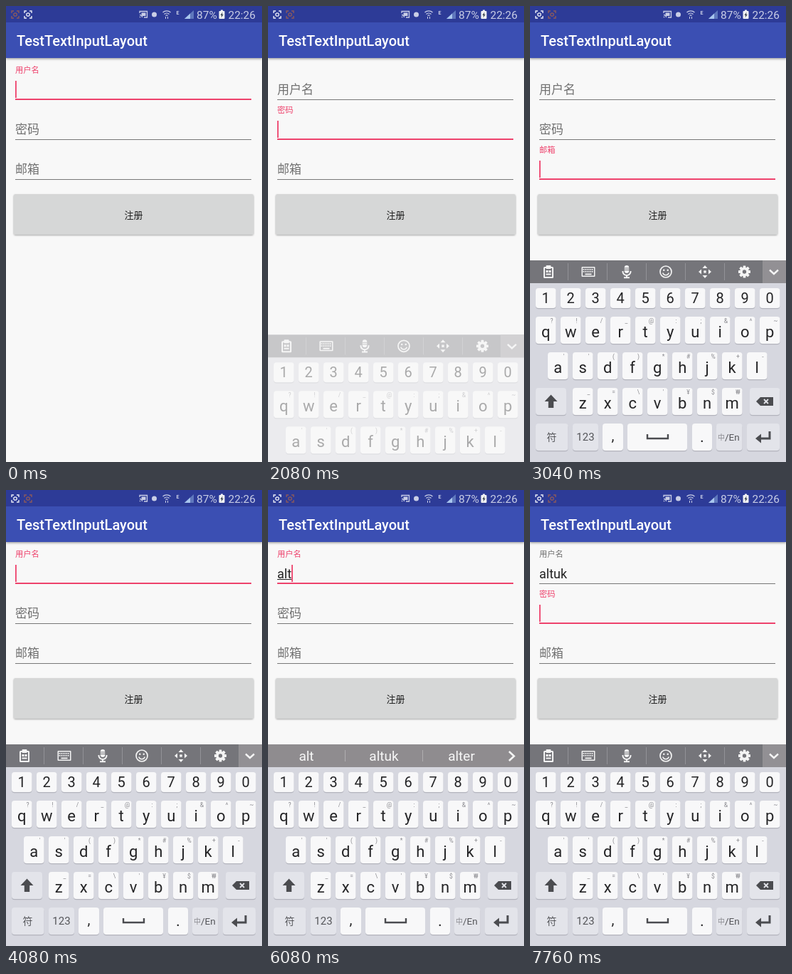
An HTML page for the animation above (8000 ms loop, 360 by 640 pixels).

```html
<!DOCTYPE html>
<html lang="zh">
<head>
<meta charset="utf-8">
<title>TestTextInputLayout</title>
<style>
html, body { margin: 0; width: 100%; height: 100%; overflow: hidden; background: #f8f8f8; }
svg { display: block; width: 360px; height: 640px; font-family: Roboto, "Noto Sans CJK SC", "Noto Sans CJK", sans-serif; }
.mid { text-anchor: middle; }
.line { fill: none; stroke: #f4f4f4; stroke-width: 2; }
</style>
</head>
<body>
<svg id="stage" viewBox="0 0 360 640" xmlns="http://www.w3.org/2000/svg"></svg>
<script>
const LOOP = 8000;
const PINK = [238, 66, 108], GRAY = [112, 112, 112];
const HINTS = ['用户名', '密码', '邮箱'];
const FOCUS = [[0, 0], [1800, 1], [2760, 2], [3640, 0], [7280, 1]];
const BLINK_OFF = [[640, 1120], [1600, 1800], [2320, 2760], [3280, 3640], [4560, 5040], [6960, 7280]];
const KEYBOARD_IN = 2000, TOOLBAR_BACK = 7280;
// time of press, time of release, letter, suggestions
const PRESSES = [
  [5040, 5280, 'a', ['a', 'at', 'and']],
  [5520, 5680, 'l', ['al', 'altuk', 'all']],
  [5840, 6000, 't', ['alt', 'altuk', 'alter']],
  [6240, 6400, 'u', ['altu', 'altuk', 'alto']],
  [6480, 6600, 'k', ['altuk', 'Altuk', 'alone']]
];

const rect = (x, y, w, h, fill, r = 0, more = '') =>
  `<rect x="${x}" y="${y}" width="${w}" height="${h}" rx="${r}" fill="${fill}" ${more}/>`;
const text = (x, y, size, str, fill, more = '') =>
  `<text x="${x}" y="${y}" font-size="${size}" fill="${fill}" ${more}>${str.replace('&', '&amp;')}</text>`;
const mid = (x, y, size, str, fill, more = '') => text(x, y, size, str, fill, 'class="mid" ' + more);
const path = (d, more = 'class="line"') => `<path d="${d}" ${more}/>`;
const at = (x, y, body) => `<g transform="translate(${x} ${y})">${body}</g>`;

function statusBar() {
  const pale = '#c9cee6';
  const capture = (x, color) => at(x, 12, path('M-5-2V-5H-2M2-5H5V-2M5 2V5H2M-2 5H-5V2',
    `fill="none" stroke="${color}" stroke-width="1.4"`) +
    `<circle r="2.2" fill="none" stroke="${color}" stroke-width="1.3"/>`);
  const stroke = `fill="none" stroke="${pale}" stroke-width="1.3"`;
  return rect(0, 0, 360, 23, '#2d3b97') +
    `<g id="early">${capture(13, '#8c5a5c')}${capture(31, '#eceef8')}</g>` +
    `<g id="later">${capture(13, '#eceef8')}${capture(31, '#8c5a5c')}</g>` +
    path('M188 10V7.5H198.500V16H194M188 12.500A3.500 3.500 0 0 1 191.500 16M188 15L189 16', stroke) +
    rect(190.5, 9.5, 6, 4.5, pale) +
    `<circle cx="208.500" cy="12" r="3.500" fill="${pale}"/>` +
    path('M220.500 9A8 8 0 0 1 231.500 9M222.500 11.500A5 5 0 0 1 229.500 11.500M224.500 13.500A2.500 2.500 0 0 1 227.500 13.500', stroke) +
    path('M224.500 15V18M227.500 15V18', `stroke="${pale}"`) +
    mid(241.5, 12, 7, 'E', pale, 'font-weight="700"') +
    path('M251 18L264 6V18Z', 'fill="#5f78bd"') + path('M251 18L259 10.500V18Z', 'fill="#a8c6ee"') +
    text(268, 17.5, 15.5, '87%', pale) +
    rect(299.5, 7, 8, 11, '#f1f2f4', 1) + rect(302, 5.5, 3, 2, '#f1f2f4') +
    path('M304.500 8.500L301.500 13H303.200L302.500 16.500L305.800 11.800H304Z', 'fill="#3c4550"') +
    text(312.5, 17.5, 15.4, '22:26', pale);
}

function form() {
  const fields = HINTS.map((hint, i) =>
    rect(13, 131 + 56 * i, 332, 1, '#777', 0, `id="rule${i}"`) +
    text(0, 0, 17, hint, '#707070', `id="hint${i}"`)).join('');
  return rect(0, 23, 360, 50, '#3a4fb3', 0, 'filter="url(#soft)"') +
    text(15, 56, 20, 'TestTextInputLayout', '#fff', 'font-weight="500"') + fields +
    text(13, 123.5, 18, '', '#222', 'id="typed"') +
    rect(13, 125, 0, 1, '#222', 0, 'id="under"') +
    rect(13, 105, 1.8, 24, 'rgb(238,66,108)', 0, 'id="cursor"') +
    rect(11, 264, 337, 56.5, '#d6d7d7', 2, 'filter="url(#lift)"') +
    mid(179.5, 297.5, 13, '注册', '#1c1c1c', 'font-weight="500"');
}

function toolbar() {
  const w = '#f4f4f4', bar = '#75757a';
  const divs = [53, 108, 163, 218, 273].map(x => rect(x, 361, 1, 24, '#929297')).join('');
  const dots = [-4, -1].map(y => [-7, -4, -1, 2, 5].map(x => rect(x, y, 2, 1.6, bar)).join('')).join('');
  const teeth = [0, 45, 90, 135].map(a => rect(-1.9, -8.5, 3.8, 17, w, 0.6, `transform="rotate(${a})"`)).join('');
  const arrows = [0, 90, 180, 270].map(a =>
    `<path d="M-3.500-5L0-9L3.500-5Z" fill="${w}" transform="rotate(${a})"/>`).join('');
  return rect(0, 357, 360, 32, bar) + rect(327, 357, 33, 32, '#929094') + divs +
    at(26, 373, rect(-7, -7, 14, 16, w, 1.5) + rect(-5, -5, 10, 12, bar) + rect(-3.5, -9, 7, 5, w, 1) +
      rect(-3.5, -2, 3, 3, w) + rect(0.5, -2, 3, 3, w) + rect(-3.5, 2.5, 7, 2, w)) +
    at(81.5, 373, rect(-9, -7, 19, 14, w, 1) + rect(-7.5, -5.5, 16, 11, bar) +
      dots.split(bar).join(w) + rect(-4, 2.5, 9, 1.8, w)) +
    at(136, 373, rect(-3.2, -9, 6.4, 11, w, 3.2) + rect(-3.2, -5.5, 6.4, 1, bar) + rect(-3.2, -3, 6.4, 1, bar) +
      path('M-5.500-1V0A5.500 5 0 0 0 5.500 0V-1M0 5V8M-4 8.200H4')) +
    at(191, 373, '<circle r="8" class="line" style="stroke-width:1.7"/>' + rect(-4, -3.5, 2.5, 2.5, w, 1.2) +
      rect(1.5, -3.5, 2.5, 2.5, w, 1.2) + path('M-4.300 1.500A4.500 4.500 0 0 0 4.300 1.500', 'class="line" style="stroke-width:1.5"')) +
    at(246, 373, arrows + rect(-1.7, -1.7, 3.4, 3.4, w, 1)) +
    at(301.5, 373, teeth + `<circle r="6.300" fill="${w}"/><circle r="2.700" fill="${bar}"/>`) +
    path('M337 370.500L343 376L349 370.500', 'class="line" style="stroke-width:2.4"');
}

function suggestions() {
  return rect(0, 357, 360, 32, '#8f8c8f') + rect(108, 365, 1, 16, '#b0aeb0') + rect(217, 365, 1, 16, '#b0aeb0') +
    [54, 163, 272].map((x, i) => mid(x, 380, 19, '', '#f7f7f7', `id="word${i}"`)).join('') +
    path('M339 367L346 373.500L339 380', 'class="line" style="stroke-width:2.6"');
}

const keyAt = {};
const LIGHT = '#f8f8f9', DIM = '#e3e4ea', INK = '#242426';
const cap = (x, y, w, h, fill) => rect(x, y + 1.3, w, h, '#b3b4bd', 4) + rect(x, y, w, h, fill, 4);

function keyRow(x0, y, h, letters, marks, size) {
  return [...letters].map((c, i) => {
    const x = x0 + 35 * i;
    keyAt[c] = [x + 14, y];
    return cap(x, y, 28.5, h, LIGHT) + mid(x + 14.2, y + h / 2 + size * 0.36 + (marks ? 2 : 0), size, c, INK) +
      (marks ? mid(x + 22.5, y + 9, 8.5, marks[i], '#8b8b90') : '');
  }).join('');
}

function keyboard() {
  return rect(0, 389, 360, 251, '#d6d7df') +
    `<g id="tools">${toolbar()}</g><g id="words">${suggestions()}</g>` +
    keyRow(8, 396, 28, '1234567890', '', 20) +
    keyRow(8, 436, 38, 'qwertyuiop', '?!/_@:;&^~', 22) +
    keyRow(25, 486, 38, 'asdfghjkl', "''()*#%+-", 22) +
    keyRow(60, 536, 38, 'zxcvbnm', "_=\\'¥$₩", 22) +
    cap(8, 536, 43, 38, DIM) + path('M29.500 545.500L38.500 555H33.200V564H25.800V555H20.500Z', 'fill="#4b4c50"') +
    cap(309, 536, 42.5, 38, DIM) + path('M318 555L324 549H342V561H324Z', 'fill="#4b4c50"') +
    path('M329 552L335 558M335 552L329 558', `stroke="${DIM}" stroke-width="1.8"`) +
    cap(8, 586, 45.500, 38, DIM) + mid(30.5, 610, 14, '符', '#55565a') +
    cap(60, 586, 36, 38, DIM) + mid(78, 610, 15, '123', '#55565a') +
    cap(102, 586, 29, 38, LIGHT) + mid(116.5, 610, 20, ',', INK) +
    cap(137, 586, 84, 38, LIGHT) + path('M165 601V607H194V601', 'fill="none" stroke="#4b4c50" stroke-width="2.4"') +
    cap(228, 586, 28, 38, LIGHT) + mid(242, 612, 22, '.', INK) +
    cap(262, 586, 36.5, 38, DIM) + text(264, 609, 10, '中', '#8a8b90') + text(274, 610, 13.5, '/En', '#55565a') +
    cap(305, 586, 46, 38, DIM) +
    path('M337 597V607H323', 'fill="none" stroke="#4b4c50" stroke-width="3"') +
    path('M325 600.500V613.500L317 607Z', 'fill="#4b4c50"') +
    `<g id="popup">${rect(-27, -75, 54, 67, '#fafafa', 6, 'filter="url(#lift)"')}${mid(0, -26, 41, '', INK, 'id="big"')}</g>`;
}

const stage = document.getElementById('stage');
stage.innerHTML = `<defs>
  <filter id="soft" x="-5%" y="-20%" width="110%" height="160%"><feDropShadow dx="0" dy="1.500" stdDeviation="1.500" flood-opacity=".35"/></filter>
  <filter id="lift" x="-10%" y="-10%" width="120%" height="125%"><feDropShadow dx="0" dy="1.200" stdDeviation="1" flood-opacity=".38"/></filter>
  </defs>` + rect(0, 0, 360, 640, '#f8f8f8') + form() + statusBar() + `<g id="keyboard">${keyboard()}</g>`;

const el = {};
stage.querySelectorAll('[id]').forEach(node => el[node.id] = node);
const set = (id, attrs) => { for (const k in attrs) el[id].setAttribute(k, attrs[k]); };
const show = (id, on) => set(id, { visibility: on ? 'visible' : 'hidden' });
const write = (id, str) => { if (el[id].textContent !== str) el[id].textContent = str; };
const clamp = v => Math.max(0, Math.min(1, v));
const mix = (a, b, p) => a + (b - a) * p;

function drawFields(t, typed) {
  const step = FOCUS.filter(f => f[0] <= t).length - 1;
  const [start, now] = FOCUS[step];
  const before = step ? FOCUS[step - 1][1] : -1;
  const p = step ? clamp((t - start) / 200) : 1;
  const ease = p * p * (3 - 2 * p);
  HINTS.forEach((_, i) => {
    const heat = i === now ? ease : i === before ? 1 - ease : 0;
    const lift = i === 0 && typed ? 1 : heat;
    const color = GRAY.map((g, k) => Math.round(mix(g, PINK[k], heat)));
    set('hint' + i, {
      transform: `translate(13 ${mix(122.5, 94.2, lift) + 56 * i}) scale(${mix(1, 0.665, lift)})`,
      fill: `rgb(${color})`
    });
    const on = i === now;
    set('rule' + i, { y: 131 + 56 * i - (on ? 1 : 0), height: on ? 2 : 1, fill: on ? `rgb(${PINK})` : '#777' });
  });
  write('typed', typed);
  const width = typed ? el.typed.getComputedTextLength() : 0;
  set('under', { width: now === 0 ? width : 0 });
  set('cursor', { x: 13 + (now === 0 ? width : 0), y: 105 + 56 * now });
  show('cursor', !BLINK_OFF.some(([a, b]) => t >= a && t < b));
}

function drawKeyboard(t, done) {
  const rest = (1 - clamp((t - KEYBOARD_IN) / 400)) ** 2;
  set('keyboard', { transform: `translate(0 ${164 * rest})`, opacity: 1 - rest });
  const last = done[done.length - 1];
  const busy = !!last && t < TOOLBAR_BACK;
  show('tools', !busy);
  show('words', busy);
  if (busy) last[3].forEach((word, i) => write('word' + i, word));
  const held = !!last && t < last[1];
  show('popup', held);
  if (held) {
    write('big', last[2]);
    const [x, y] = keyAt[last[2]];
    set('popup', { transform: `translate(${x} ${y})` });
  }
}

const begin = performance.now();
function draw() {
  const t = Math.max(0, performance.now() - begin) % LOOP;
  const done = PRESSES.filter(press => press[0] <= t);
  show('early', t < 160);
  show('later', t >= 160);
  drawFields(t, done.map(press => press[2]).join(''));
  drawKeyboard(t, done);
  requestAnimationFrame(draw);
}
draw();
</script>
</body>
</html>
```
